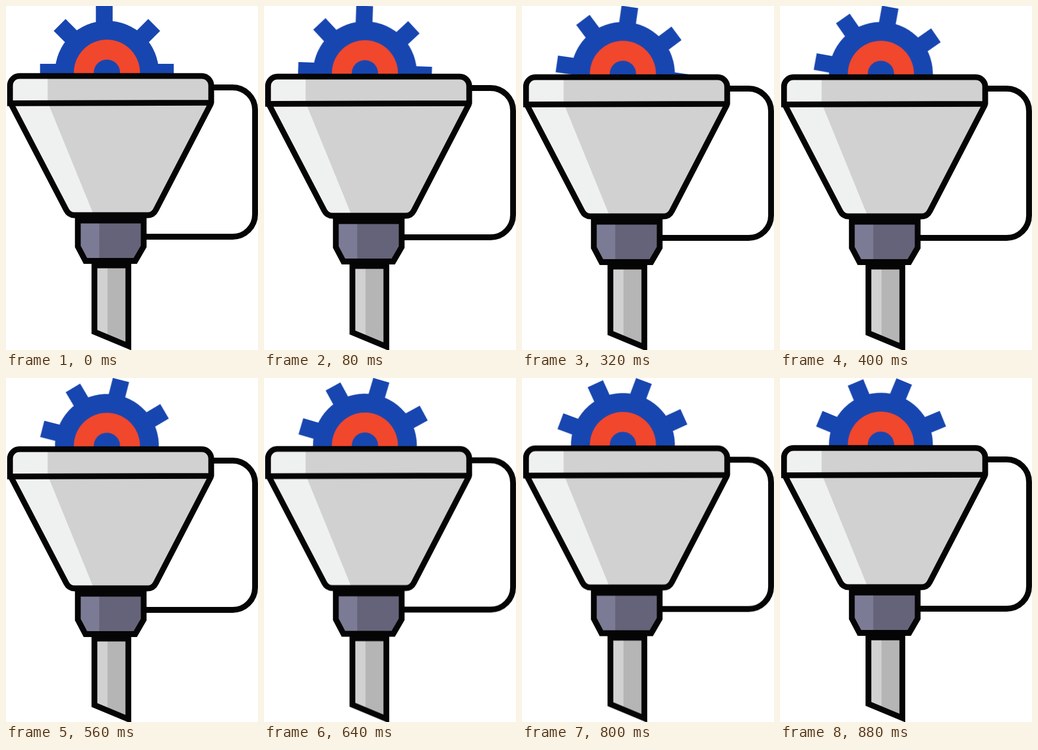
Recreate the animation shown at these times as an HTML page without scripts. Size 427x583 px, loop 0.96 s.

```html
<!DOCTYPE html>
<html lang="en">
<head>
<meta charset="utf-8">
<title>Gear in a funnel</title>
<style>
  html, body { margin: 0; width: 100%; height: 100%; overflow: hidden; background: #fff; }
  svg { display: block; width: 427px; height: 583px; }

  .bob { animation: bob 960ms step-end infinite; }
  .gear { fill: #1846b0; transform-origin: 171px 113px; animation: turn 960ms steps(12, end) infinite; }
  .line { fill: none; stroke: #050505; stroke-width: 9.8; }
  .round { stroke-linejoin: round; }

  /* 22.5deg over eleven steps, then a hard jump back */
  @keyframes turn { to { transform: rotate(24.545deg); } }
  @keyframes bob {
    0% { transform: translateY(0); }
    8.333% { transform: translateY(1px); }
    16.666% { transform: translateY(2px); }
    66.666% { transform: translateY(1.5px); }
    75% { transform: translateY(1px); }
    83.333% { transform: translateY(.5px); }
    91.666%, 100% { transform: translateY(0); }
  }
</style>
</head>
<body>
<svg viewBox="0 0 427 583">
  <defs>
    <path id="tooth" d="M156.8 -.3h28.4v50h-28.4z"/>
    <path id="lid" d="M6.8 164.8V134.7a16 16 0 0 1 16-16H331.7a16 16 0 0 1 16 16V163.8z"/>
    <path id="cone" d="M8 165L102 345.5Q106.5 354.5 116 354.5H240Q249.5 354.5 254 345.5L347.5 165"/>
    <path id="neck" d="M121.7 363.5H233.3V407.5L219 432H134.6L121.7 407.5z"/>
    <path id="spout" d="M149.8 439.5H207.3V576.2L149.8 552.2z"/>
    <clipPath id="in-cone"><use href="#cone"/></clipPath>
    <clipPath id="in-lid"><use href="#lid"/></clipPath>
    <clipPath id="in-neck"><use href="#neck"/></clipPath>
    <clipPath id="in-spout"><use href="#spout"/></clipPath>
  </defs>

  <g class="bob">
    <g class="gear">
      <circle cx="171" cy="113" r="88"/>
      <g transform="translate(0 -.8)">
        <use href="#tooth" transform="rotate(-90 171 113)"/>
        <use href="#tooth" transform="rotate(-45 171 113)"/>
        <use href="#tooth" x="-4.5"/>
        <use href="#tooth" transform="rotate(45 171 113)"/>
        <use href="#tooth" transform="rotate(90 171 113)"/>
      </g>
      <circle cx="171" cy="113" r="56" fill="#f1472d"/>
      <circle cx="171" cy="113" r="22.3"/>
    </g>

    <path class="line" d="M348 138H384A38 38 0 0 1 422 176V353A38 38 0 0 1 384 391H234"/>

    <use href="#spout" fill="#b5b5b5"/>
    <path clip-path="url(#in-spout)" fill="#d1d1d1" d="M140 435h32v148h-32z"/>
    <use href="#spout" class="line"/>

    <use href="#neck" fill="#646379"/>
    <path clip-path="url(#in-neck)" fill="#7c7b95" d="M115 360h43v75h-43z"/>
    <use href="#neck" class="line"/>

    <use href="#cone" fill="#d1d1d1"/>
    <path clip-path="url(#in-cone)" fill="#eff1f0" d="M0 160H69.5L149 355H0z"/>
    <use href="#cone" class="line round"/>

    <use href="#lid" fill="#d1d1d1"/>
    <path clip-path="url(#in-lid)" fill="#eff1f0" d="M0 115h70.5v50H0z"/>
    <use href="#lid" class="line round"/>
    <path d="M2 160h9v9.7H2z" fill="#050505"/>
  </g>
</svg>
</body>
</html>
```
